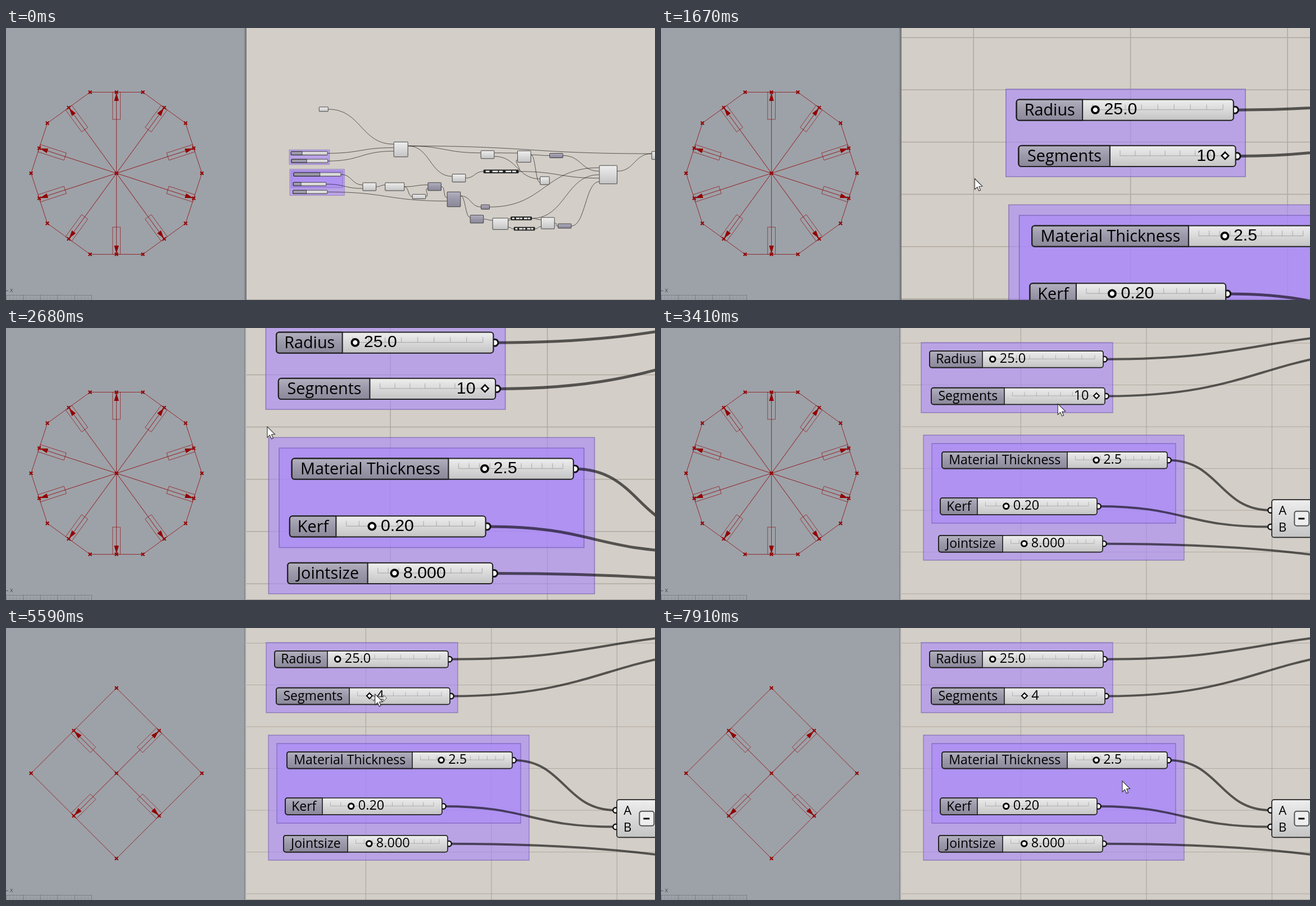
An HTML page with a canvas that plays this animation: 1155 by 485 pixels, repeating every 8 s.

```html
<!DOCTYPE html>
<html lang="en">
<head>
<meta charset="utf-8">
<title>Polygon segments slider</title>
<style>
html, body { margin: 0; width: 100%; height: 100%; overflow: hidden; background: #d3cec7; }
canvas { display: block; }
</style>
</head>
<body>
<canvas id="stage" width="1155" height="485"></canvas>
<script>
const ctx = document.getElementById('stage').getContext('2d');
const W = 1155, H = 485, LOOP = 8000, SPLIT = 428;
const UI = '"Open Sans", "Noto Sans", sans-serif';
const ARIAL = '"Liberation Sans", Arial, sans-serif';
const GRAB = 1840, DROP = 2640, ZOOM_OUT = 2930, DRAG = 4290, RELEASE = 7280;

const clamp = (v, lo = 0, hi = 1) => Math.max(lo, Math.min(hi, v));
const easeOut = u => 1 - (1 - u) ** 2;

// Pointer moves: start, end, x, y
const moves = [
  [0, 790, 481.5, 238.5], [1600, 1800, 613, 290],
  [GRAB, 2130, 502, 246.5], [2130, 2370, 461.5, 170], [2590, 2670, 465, 176],
  [3010, 3710, 760, 126], [3800, 4040, 776, 118],
  [DRAG, 4960, 676, 118], [5060, 5370, 665, 118], [5460, 5590, 657, 118],
  [5590, 5970, 621, 118], [6290, 6440, 591, 118], [6520, RELEASE, 653, 118],
  [7460, 7910, 821, 273]
];

function pointerAt(t) {
  return moves.reduce(([px, py], [a, b, x, y]) => {
    const e = easeOut(clamp((t - a) / (b - a)));
    return [px + (x - px) * e, py + (y - py) * e];
  }, [1030, 505]);
}

// The slider follows the pointer only while it is dragged.
function segmentsAt(t) {
  const [x] = pointerAt(clamp(t, DRAG, RELEASE));
  return clamp(Math.round(3 + (x - 628) / 21.3), 3, 10);
}

// Wheel zoom in steps of 1.25 about a fixed point, then a hand pan, then one step out.
const ZOOM_AT = [482, 239], ANCHOR = [357.5, 130];
const scaleAt = n => 0.64 * 1.25 ** (n - 5);

function viewAt(t) {
  if (t >= ZOOM_OUT) return { s: 1, x: 0, y: 0 };
  const n = t < 1190 ? Math.max(0, 2 * Math.floor((t - 980) / 70))
                     : Math.min(8, 5 + Math.floor((t - 1190) / 135));
  const s = scaleAt(n);
  const from = pointerAt(GRAB), to = pointerAt(clamp(t, GRAB, 2370));
  const [x, y] = ZOOM_AT.map((c, i) => c - s * ANCHOR[i] + to[i] - from[i]);
  return { s, x, y };
}

// ---- graph model, in canvas units ----
const ROW = 29.6;
const S0 = scaleAt(0);
const portY = (cy, i, count) => cy + ROW * (i - (count - 1) / 2);

// Centres are given as seen in the zoomed-out view.
function node(cx, cy, rows, opts = {}) {
  const w = (opts.width || 23.6) / S0, h = opts.height || ROW * rows + 8;
  const x = (cx - ZOOM_AT[0]) / S0 + ANCHOR[0], y = (cy - ZOOM_AT[1]) / S0 + ANCHOR[1];
  return { outs: 1, ...opts, rows, cy: y, x: x - w / 2, y: y - h / 2, w, h, right: x + w / 2 };
}

function slider(name, x, y, head, rail, value, max, ticks = 10) {
  return { name, x, y, h: 29.8, cy: y + 14.9, mid: x + head, right: x + head + rail,
    value, max, ticks, rows: 0, outs: 1 };
}

const DARK = { dark: true };
const strip = width => ({ width, height: 27, strip: true });

const sliders = {
  radius: slider('Radius', 478, 40.8, 94, 215, '25.0', 1250, 8),
  segments: slider('Segments', 481, 106.6, 130, 179),
  thickness: slider('Material Thickness', 500, 220.8, 223, 178, '2.5', 10),
  kerf: slider('Kerf', 497, 303, 66, 213, '0.20', 1),
  joint: slider('Jointsize', 494, 369.8, 114, 178, '8.000', 50)
};

const nodes = {
  point: node(565.3, 144.8, 1, { width: 16 }),
  polygon: node(702.7, 216.5, 4, { width: 25, outs: 3, labels: ['P', 'R', 'S', 'Rf'], face: hexagon }),
  minus: node(646.8, 283, 2, { labels: ['A', 'B'], result: 'R', face: minusSign }),
  half: node(691.8, 283, 2, { width: 34, labels: ['x', 'y'], face: formula }),
  negate: node(735, 300.6, 1),
  domain: node(762.7, 282.8, 2, DARK),
  rect: node(797, 305.5, 4, { ...DARK, outs: 3 }),
  middle: node(806, 267.6, 2),
  curve: node(857, 225.8, 2, { outs: 2 }),
  cross: node(922.2, 229.2, 3, { outs: 2 }),
  vector: node(979.3, 227.5, 1, DARK),
  amp: node(958.8, 272.2, 2, { width: 16.5 }),
  number: node(853, 319.2, 1, { ...DARK, width: 15 }),
  explode: node(838, 340.8, 2, DARK),
  parts: node(879.8, 349.2, 3, { width: 27.5, outs: 3 }),
  list: node(964.3, 348, 3),
  corner: node(994.2, 353, 1, DARK),
  plane: node(1071.8, 261.5, 5, { width: 31.5, outs: 3 }),
  result: node(1161, 227.2, 2),
  stripA: node(881, 255.8, 1, strip(62)),
  stripB: node(917, 339.5, 1, strip(37)),
  stripC: node(922.5, 358, 1, strip(37))
};

// "from.output > to.input"; a missing port means the first
const links = `point > polygon; radius > polygon.1; segments > polygon.2;
  polygon > curve; polygon > middle; polygon > result; thickness > minus; kerf > minus.1;
  minus > half; half > domain; half > negate; negate > domain.1; domain > rect.1; joint > rect.2;
  rect > number; rect > explode; explode > parts; parts > stripB; parts.2 > stripC;
  stripB > list; stripC > list.2; stripB > plane.2; list > corner; corner > plane.4;
  number > plane; middle > stripA; stripA > plane.3; stripA > cross.2; curve > cross;
  curve.1 > amp; cross > amp.1; cross > vector; vector > plane.1; plane > result`
  .split(';').map(l => l.split('>').map(end => {
    const [key, port = 0] = end.trim().split('.');
    return [sliders[key] || nodes[key], +port];
  }));

// ---- drawing helpers ----
function line(...p) {
  ctx.beginPath();
  for (let i = 0; i < p.length; i += 2) ctx.lineTo(p[i], p[i + 1]);
}

function box(x, y, w, h, r, fill, stroke) {
  ctx.beginPath();
  ctx.roundRect(x, y, w, h, r);
  if (fill) { ctx.fillStyle = fill; ctx.fill(); }
  if (stroke) { ctx.strokeStyle = stroke; ctx.stroke(); }
}

function shade(y, h, ...colors) {
  const g = ctx.createLinearGradient(0, y, 0, y + h);
  colors.forEach((c, i) => g.addColorStop(i / (colors.length - 1), c));
  return g;
}
const light = (y, h) => shade(y, h, '#eeeeee', '#d9d9d9', '#c4c4c5');
const dark = (y, h) => shade(y, h, '#b3b1bf', '#9a98a9', '#8a8899');

function text(str, x, y, size, align = 'center', family = UI) {
  ctx.font = `${size}px ${family}`;
  ctx.textAlign = align;
  ctx.fillStyle = '#000';
  ctx.fillText(str, x, y);
}

function wire([from, out], [to, input]) {
  const x1 = from.right + 2, y1 = portY(from.cy, out, from.outs);
  const x2 = to.x - 2, y2 = portY(to.cy, input, to.rows);
  const bend = Math.max((x2 - x1) / 2, 35);
  ctx.beginPath();
  ctx.moveTo(x1, y1);
  ctx.bezierCurveTo(x1 + bend, y1, x2 - bend, y2, x2, y2);
  ctx.stroke();
}

function grips({ x, right, cy, rows, outs }) {
  const dot = (px, i, count) => {
    ctx.beginPath();
    ctx.arc(px, portY(cy, i, count), 4.8, 0, 7);
    ctx.fill();
    ctx.stroke();
  };
  ctx.fillStyle = '#fff';
  ctx.strokeStyle = '#111';
  ctx.lineWidth = 2.4;
  for (let i = 0; i < rows; i++) dot(x - 2, i, rows);
  for (let i = 0; i < outs; i++) dot(right + 2, i, outs);
}

// ---- node faces ----
function hexagon(cx, cy) {
  ctx.strokeStyle = '#444';
  ctx.lineWidth = 4;
  ctx.beginPath();
  for (let i = 0; i < 6; i++) ctx.lineTo(cx + 5 - 15 * Math.cos(i * Math.PI / 3), cy - 15 * Math.sin(i * Math.PI / 3));
  ctx.closePath();
  ctx.stroke();
}

function minusSign(cx, cy) {
  ctx.lineWidth = 2;
  box(cx - 16, cy - 13, 26, 26, 4, '#eee', '#555');
  ctx.fillStyle = '#111';
  ctx.fillRect(cx - 9, cy - 1.4, 11, 3);
}

function formula(cx, cy) {
  ctx.globalAlpha = 1;
  ctx.lineWidth = 2;
  box(cx - 37, cy - 31, 75, 61, 0, '#f2f2f2', '#222');
  text('x/2', cx, cy + 8, 28);
}

function drawNode(n, s, detail) {
  const { x, y, w, h, cy, right, rows } = n;
  if (s > 0.4) grips(n);
  ctx.lineWidth = Math.max(1.7, 0.8 / s);
  if (n.strip) {
    box(x, y, w, h, 4, '#222', '#111');
    ctx.fillStyle = '#eee';
    for (let i = 0; i < 5; i++) ctx.fillRect(x + w * (0.06 + i * 0.19), y + 7, w * (i % 2 ? 0.16 : 0.11), h - 14);
    return;
  }
  box(x, y, w, h, 4, (n.dark ? dark : light)(y, h), '#222');
  if (!detail || !n.face) return;
  ctx.globalAlpha = detail;
  ctx.font = `22px ${UI}`;
  const lx = x + 12 + Math.max(...n.labels.map(l => ctx.measureText(l).width)) / 2;
  n.labels.forEach((l, i) => text(l, lx, portY(cy, i, rows) + 8, 22));
  if (n.result) text(n.result, right - 27, cy + 8, 22);
  n.face((x + right) / 2, cy);
  ctx.globalAlpha = 1;
}

function drawSlider(sl, segs, s, detail) {
  const { name, x, y, h, cy, mid, right, ticks } = sl;
  const stepped = sl === sliders.segments;
  const value = stepped ? String(segs) : sl.value;
  const count = stepped ? 7 : ticks;
  const a = mid + 14.5, b = right - 15;
  const knob = a + (b - a) * (stepped ? (segs - 3) / 7 : value / sl.max);

  if (s > 0.4) grips(sl);
  ctx.lineWidth = Math.max(1.7, 0.8 / s);
  box(x, y, right - x, h, 4, light(y, h));
  box(x, y, mid - x, h, [4, 0, 0, 4], dark(y, h), '#26252b');
  box(x, y, right - x, h, 4, null, '#222');
  if (!detail) return;

  ctx.globalAlpha = detail;
  ctx.strokeStyle = 'rgba(0,0,0,.2)';
  ctx.lineWidth = 1;
  line(a, cy - 0.5, b, cy - 0.5);
  for (let i = 0; i <= count; i++) {
    const tx = a + (b - a) * i / count;
    ctx.moveTo(tx, cy - 0.5);
    ctx.lineTo(tx, cy - 8);
  }
  ctx.stroke();
  text(name, (x + mid) / 2 + 0.3, cy + 7.7, 23);
  const before = stepped && segs > 6;
  const [font, size] = s > 1.1 ? [ARIAL, 24.2] : [UI, 23.5];
  text(value, knob + (before ? -13.5 : 12.5), cy + 6.5, size, before ? 'right' : 'left', font);
  ctx.beginPath();
  if (stepped) {
    line(knob - 5, cy - 0.5, knob, cy - 5.5, knob + 5, cy - 0.5, knob, cy + 4.5);
    ctx.closePath();
  } else ctx.arc(knob, cy - 0.2, 4.8, 0, 7);
  ctx.fillStyle = '#fff';
  ctx.fill();
  ctx.strokeStyle = '#000';
  ctx.lineWidth = stepped ? 2 : 3;
  ctx.stroke();
  ctx.globalAlpha = 1;
}

function drawGrid(detail) {
  ctx.strokeStyle = `rgba(70,60,45,${0.25 * detail ** 1.6})`;
  ctx.lineWidth = 1.2;
  ctx.beginPath();
  for (let i = -2; i < 6; i++) {
    const gx = 640.4 + 223.5 * i;
    ctx.moveTo(gx, -300);
    ctx.lineTo(gx, 700);
  }
  for (let i = -4; i < 9; i++) {
    const gy = 27 + 74.5 * i;
    ctx.moveTo(190, gy);
    ctx.lineTo(1500, gy);
  }
  ctx.stroke();
}

function drawGraph({ s, x, y }, segs) {
  const detail = s < 0.5 ? 0 : clamp((s - 0.5) / 0.3);
  ctx.fillStyle = '#d3cec7';
  ctx.fillRect(0, 0, W, H);
  ctx.save();
  ctx.translate(x, y);
  ctx.scale(s, s);
  if (detail) drawGrid(detail);

  ctx.lineWidth = Math.max(1.3, 0.8 / s);
  const tint = 'rgba(168,135,251,.6)', edge = 'rgba(90,65,160,.5)';
  box(463, 26, 341, 125, 0, tint, edge);
  box(467, 191, 464, 223, 0, tint, edge);
  box(482, 206, 434, 142, 0, tint, edge);

  ctx.strokeStyle = `rgba(0,0,0,${s < 0.5 ? 0.7 : 0.6})`;
  ctx.lineWidth = 4;
  links.forEach(l => wire(...l));
  Object.values(nodes).forEach(n => drawNode(n, s, detail));
  Object.values(sliders).forEach(sl => drawSlider(sl, segs, s, detail));
  ctx.restore();
  ctx.fillStyle = 'rgba(60,60,60,.35)';
  ctx.fillRect(0, H - 1, W, 1);
}

// ---- model viewport ----
function cross(x, y) {
  ctx.moveTo(x - 2.8, y - 2.8); ctx.lineTo(x + 2.8, y + 2.8);
  ctx.moveTo(x + 2.8, y - 2.8); ctx.lineTo(x - 2.8, y + 2.8);
}

function drawPolygon(n) {
  const R = 152, inner = R * Math.cos(Math.PI / n), turn = Math.PI * 2 / n;
  const at = (r, a) => [r * Math.cos(a), r * Math.sin(a)];
  ctx.save();
  ctx.translate(196.6, 259);
  ctx.strokeStyle = 'rgba(146,10,14,.8)';
  ctx.fillStyle = '#930000';
  ctx.lineWidth = 1;
  ctx.beginPath();
  for (let i = 0; i < n; i++) ctx.lineTo(...at(R, i * turn));
  ctx.closePath();
  ctx.stroke();
  for (let i = 0; i < n; i++) {
    ctx.save();
    ctx.rotate((i + 0.5) * turn);
    line(0, 0, inner, 0);
    ctx.stroke();
    ctx.lineWidth = 0.8;
    ctx.strokeRect(inner - 48.5, -6.8, 48.5, 13.6);
    ctx.lineWidth = 1;
    line(inner - 1, 0, inner - 15.5, -4.2, inner - 15.5, 4.2);
    ctx.fill();
    ctx.restore();
  }
  ctx.strokeStyle = '#930000';
  ctx.lineWidth = 2.1;
  ctx.beginPath();
  cross(0, 0);
  for (let i = 0; i < n; i++) {
    cross(...at(R, i * turn));
    cross(...at(inner, (i + 0.5) * turn));
  }
  ctx.stroke();
  ctx.restore();
}

function ruler(step, y, alpha) {
  ctx.strokeStyle = `rgba(80,85,92,${alpha})`;
  ctx.lineWidth = 1;
  line(0, y, 152.5, y);
  for (let x = 0.5; x < 153; x += step) { ctx.moveTo(x, 476); ctx.lineTo(x, H); }
  ctx.stroke();
}

function drawViewport(t, segs) {
  ctx.fillStyle = '#9da2a8';
  ctx.fillRect(0, 0, SPLIT, H);
  const g = ctx.createLinearGradient(423, 0, SPLIT, 0);
  g.addColorStop(0, 'rgba(80,82,86,0)');
  g.addColorStop(1, 'rgba(80,82,86,.7)');
  ctx.fillStyle = g;
  ctx.fillRect(423, 0, 5, H);
  if (t >= GRAB) {
    ctx.fillStyle = '#c3c1be';
    ctx.fillRect(426, 0, 2, H);
  }
  ruler(30.4, 476.5, 0.4);
  ruler(6.08, 482.5, 0.13);
  ctx.fillStyle = '#50555b';
  ctx.fillRect(0, 468, 4, 1);
  ctx.font = `11px ${ARIAL}`;
  ctx.textAlign = 'left';
  ctx.fillText('x', 7, 471);
  drawPolygon(segs);
}

// ---- pointers ----
function paint(fill, stroke, width) {
  ctx.closePath();
  ctx.fillStyle = fill;
  ctx.fill();
  ctx.strokeStyle = stroke;
  ctx.lineWidth = width;
  ctx.stroke();
}

function drawArrow() {
  ctx.scale(1.13, 1.13);
  line(0, 0, 0, 17, 4, 13.4, 6.6, 19.3, 9.2, 18.2, 6.7, 12.4, 12, 12);
  paint('#fff', '#222', 0.9);
}

function drawResize() {
  line(-8, 7, -2, 1.5, -2, 5, 15, 5, 15, 1.5, 21, 7, 15, 12.5, 15, 9, -2, 9, -2, 12.5);
  paint('#e4e4e4', '#555', 1);
}

function drawHand() {
  line(-9.5, -1, -7.5, -2, -5, 1, 8, -1, 7.5, 6, 5, 12, -3, 12, -7, 5);
  paint('#fff', '#222', 1.6);
  for (let i = 0; i < 4; i++) {
    box(-7.5 + i * 3.9, -8 - 3 * Math.sin(i * Math.PI / 3), 3.9, 13, 1.9, '#fff', '#333');
  }
  ctx.fillStyle = '#fff';
  ctx.fillRect(-5.5, 1.5, 12, 6);
}

function drawPointer(t) {
  if (t < 70) return;
  ctx.save();
  ctx.translate(...pointerAt(t));
  if (t >= GRAB && t < DROP) drawHand();
  else {
    if (t >= 3850 && t < 7520) drawResize();
    drawArrow();
  }
  ctx.restore();
}

function frame() {
  const t = performance.now() % LOOP;
  const segs = segmentsAt(t);
  drawGraph(viewAt(t), segs);
  drawViewport(t, segs);
  drawPointer(t);
  requestAnimationFrame(frame);
}
frame();
</script>
</body>
</html>
```
